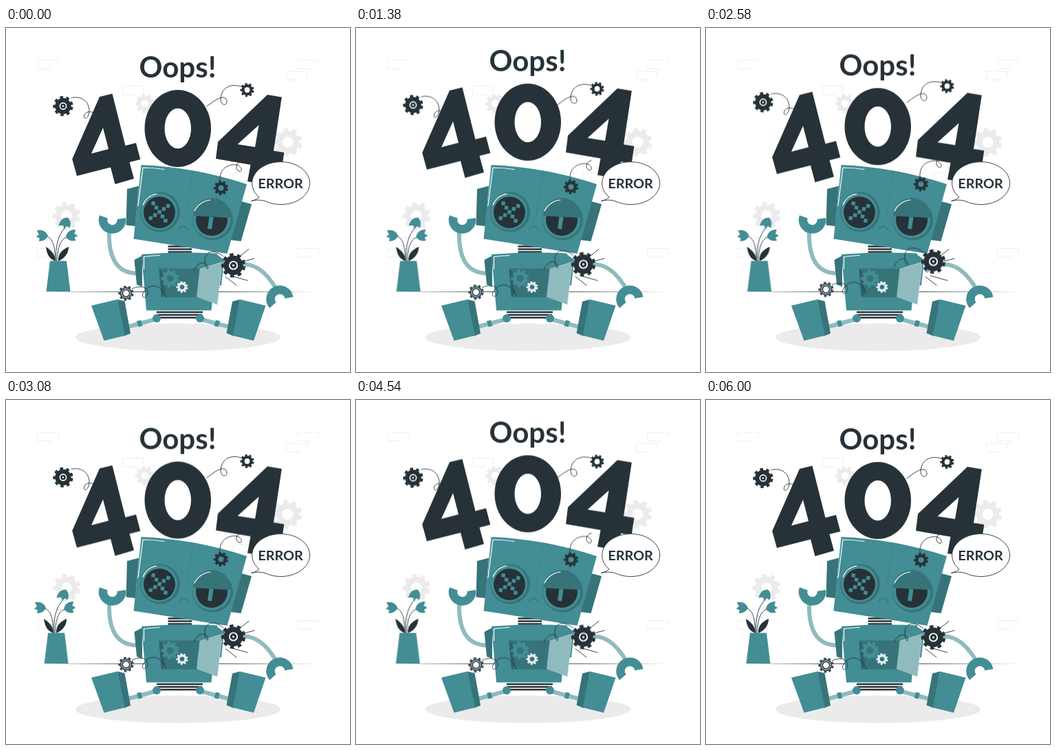
An HTML page for the animation above (6040 ms loop, 500x500 px).

```html
<!DOCTYPE html>
<html lang="en">
<head>
<meta charset="utf-8">
<title>404 error</title>
<style>
html, body { margin: 0; width: 100%; height: 100%; overflow: hidden; background: #fff; }
svg { display: block; width: 100vw; height: 100vh; }
text { font-family: Lato, "Open Sans", sans-serif; font-weight: 700; text-anchor: middle; fill: #263238; }
.ink { fill: #263238; }
.teal { fill: #438d94; }
.deep { fill: #36747a; }
.pale { fill: #8fbbbf; }
.wire { fill: none; stroke: #263238; stroke-width: .9; stroke-linecap: round; }
.shine { fill: none; stroke: #fff; stroke-width: 1.2; stroke-linecap: round; }
.seam { fill: none; stroke: #36747a; }
.limb { fill: none; stroke: #8fbbbf; stroke-width: 6; }
.claw { fill: none; stroke: #438d94; stroke-width: 12.5; }
.bricks { fill: none; stroke: #ebebeb; stroke-width: .8; }

/* 6 s of motion, then a 40 ms hold */
.float, .bob, .sway { animation: float 6040ms linear infinite; }
.bob { animation-name: bob; }
.sway { animation-name: sway; }
@keyframes float {
  0%, 49.67%, 99.34%, 100% { transform: translateY(0); }
  24.83%, 74.5% { transform: translateY(-10px); }
}
@keyframes bob {
  0%, 24.83%, 49.67%, 74.5%, 99.34%, 100% { transform: translateY(0); }
  12.42%, 37.25%, 62.08%, 86.92% { transform: translateY(-10px); }
}
@keyframes sway {
  0%, 99.34%, 100% { transform: translateX(0); }
  9.93%, 89.4% { transform: translateX(-1px); }
  19.87%, 79.47% { transform: translateX(2px); }
  29.8%, 49.67%, 69.54% { transform: translateX(-4px); }
  39.74%, 59.6% { transform: translateX(4px); }
}
</style>
</head>
<body>
<svg viewBox="0 0 500 500">
  <defs>
    <g id="gear" fill="none">
      <circle r=".6" stroke-width=".42"/>
      <circle r=".88" stroke-width=".26" pathLength="16" stroke-dasharray="1" transform="rotate(5)"/>
    </g>
    <g id="hub" stroke="none">
      <circle r=".5" fill="#263238"/>
      <circle r=".32" fill="none" stroke="#fff" stroke-width=".11"/>
      <circle r=".09" fill="#fff"/>
    </g>
    <path id="brick" d="M20 12.500H0V0H30V9"/>
    <path id="px" class="teal" d="M-2.7-2.7h5.4v5.4h-5.4z"/>
    <path id="bloom" d="M0 0C-3-7-8-9-16-8C-15-5-14-4-13-2C-15-1-16 0-17 2C-14 2-13 3-12 4C-13 5-13 6-13 8C-7 8-2 5 0 0Z"/>
  </defs>

  <!-- Background -->
  <g class="bricks">
    <use href="#brick" x="46" y="47"/>
    <use href="#brick" x="424" y="47"/>
    <use href="#brick" x="407.500" y="63"/>
    <use href="#brick" x="169.500" y="84.500"/>
    <use href="#brick" x="46" y="320.500"/>
    <use href="#brick" x="424" y="320.500"/>
    <use href="#brick" x="65" y="304.500"/>
    <use href="#brick" x="330" y="210.500"/>
  </g>
  <g stroke="#ebebeb">
    <use href="#gear" transform="translate(202 110) scale(14)"/>
    <use href="#gear" transform="translate(409.500 166) scale(20.500)"/>
    <use href="#gear" transform="translate(88 273) scale(20)"/>
  </g>
  <path class="ink" d="M46 383.300L250 382.700L454 383.300L250 383.900Z"/>
  <ellipse cx="250" cy="449.500" rx="149" ry="20" fill="#ebebeb"/>

  <!-- Plant -->
  <g class="sway">
    <g class="wire">
      <path d="M73 339C71 318 76 301 85 291"/>
      <path d="M74 339C75 320 79 306 89 304"/>
      <path d="M71 339C72 322 69 306 60 303"/>
    </g>
    <path class="ink" d="M72 339C61 335 59 326 58 318C66 323 72 330 72 339ZM76 339C75 328 82 322 91 318C91 328 85 335 76 339Z"/>
    <g class="teal">
      <use href="#bloom" transform="translate(61 302)"/>
      <use href="#bloom" transform="translate(87 304) rotate(-12) scale(-1 1)"/>
      <use href="#bloom" transform="translate(90 275.500) rotate(-68)"/>
    </g>
    <path class="teal" d="M64 338.500H88L93.500 383H58.500Z"/>
  </g>

  <!-- Heading -->
  <g class="float">
    <text x="249.500" y="72.500" font-size="42">Oops!</text>
    <g class="ink" fill-rule="evenodd">
      <path d="M136 100L154.500 95.500L173.500 171L189 167L195.300 191L179.500 195L186 219L158.500 227L152 202.500L103 215L96.200 190.500ZM141 145L124 182.500L149 176Z"/>
      <path d="M201.500 146a48.250 56 0 1 1 96.500 0a48.250 56 0 1 1-96.500 0ZM230.500 146a19.250 29.300 0 1 0 38.500 0a19.250 29.300 0 1 0-38.500 0Z"/>
      <path d="M380 97L400.800 100.500L389 178.500L404.300 181L400.600 206L385 203.400L381 228L351 223L355.500 198.700L305 190L308 165.500ZM367.500 141L336.500 169L362 173Z"/>
    </g>
  </g>

  <!-- Arms -->
  <path class="limb" d="M150 296C149 334 161 356 190 356.500"/>
  <path class="claw" d="M141.800 274.400A13.500 13.500 0 1 0 167.800 276.900"/>
  <path class="limb" d="M319 354C341 337 368 338 392 378"/>
  <path class="claw" d="M387.800 402.900A13.500 13.500 0 1 1 411.300 391.900"/>

  <!-- Legs -->
  <path class="limb" d="M219 423L178 434M282 423L323 434"/>
  <path class="teal" d="M190 426L196 424.500L198.500 433L192.500 434.500ZM311 426L305 424.500L302.500 433L308.500 434.500Z"/>
  <path class="deep" d="M162 394.500L172.500 397L181 444L171 448ZM340 394.500L329 397.500L320.500 443.500L331 448Z"/>
  <path class="teal" d="M124 403.500L162 394.500L173 447L142.500 454.500ZM377.500 403.500L340 394.500L329.500 447L360 454.500Z"/>
  <path d="M219 413H286M220 417H285M222 421H283" stroke="#263238" stroke-width="2.600"/>
  <g class="teal">
    <circle cx="219" cy="422" r="6"/>
    <circle cx="282" cy="422" r="6"/>
  </g>

  <!-- Torso -->
  <path d="M235.500 317.500H270M235.500 321.500H270M235.500 325.500H270" stroke="#263238" stroke-width="2.600"/>
  <path class="deep" d="M186.500 337L198 331V376L190 373Z"/>
  <path class="teal" d="M305 328L317 337L313 374L303 376Z"/>
  <path class="teal" d="M197 329Q252 325 307 327.500L298.500 410.500H204Z"/>
  <path class="shine" d="M200.500 350V332.500Q213 331 223 330.500"/>
  <path class="deep" d="M222.500 349.500H283V391.500H226Z"/>
  <path d="M222.500 349.500L229 356L231 386L226 391.500Z" fill="#2d6166"/>
  <use href="#gear" transform="translate(238.500 364) scale(13)" stroke="#438d94"/>
  <use href="#gear" transform="translate(256 376.500) scale(8.500)" stroke="#e3eeef"/>
  <path class="pale" d="M281.500 350.500L314.500 340L307 402L277 391Z"/>
  <path d="M281.500 350.500L314.500 340L307 402" fill="none" stroke="#b4d2d4" stroke-width=".8"/>

  <!-- Head -->
  <path class="deep" d="M176 234L193 229.500L188 288L174.500 286.500ZM342 252L357 256L341.500 310L326 308Z"/>
  <path class="teal" d="M196.500 199Q274 202 350 227L321.500 328Q253 317 185.500 306.500Z"/>
  <path class="shine" d="M192 258L199 203Q214 203 230 205.500"/>
  <path class="seam" d="M272 208L261 280" stroke-width=".6" stroke-dasharray="5 3"/>
  <path class="seam" d="M251 293Q258 283 265.500 294" stroke-width="1.300"/>

  <circle class="deep" cx="224" cy="267.500" r="29"/>
  <circle class="teal" cx="222.500" cy="267" r="26.500"/>
  <circle class="ink" cx="223" cy="268" r="23"/>
  <path class="shine" d="M199 257A26.500 26.500 0 0 1 219 241" stroke-width=".8"/>
  <g transform="translate(223 267.500) rotate(10)">
    <use href="#px"/>
    <use href="#px" x="-5.500" y="-5.500"/><use href="#px" x="5.500" y="-5.500"/>
    <use href="#px" x="-5.500" y="5.500"/><use href="#px" x="5.500" y="5.500"/>
    <use href="#px" x="-11" y="-11"/><use href="#px" x="11" y="-11"/>
    <use href="#px" x="-11" y="11"/><use href="#px" x="11" y="11"/>
  </g>

  <circle class="deep" cx="300.500" cy="279" r="29.500"/>
  <circle class="teal" cx="299" cy="278" r="27.500"/>
  <circle class="ink" cx="299" cy="279" r="23"/>
  <path class="teal" d="M295.500 274L301.500 275L299 292.500L293 291.500Z"/>
  <path class="deep" d="M272 273A27.500 27.500 0 0 1 327 276Z"/>
  <path class="shine" d="M274 266A28 28 0 0 1 297 250"/>

  <!-- Sparks -->
  <path class="wire" d="M341 331L353 321.500M346 339L361 335M319 361.500L335 374M326 360L351 367"/>

  <!-- Loose gears -->
  <g class="bob" stroke="#263238">
    <path class="wire" d="M95 101.500C110 98 121 107 121 121C120 134 111 134 114 126C117 121 123 121 127 123"/>
    <path class="wire" d="M342 85C326 80 313 87 312 103C312 114 322 113 321 106C318 94 302 106 292 114"/>
    <path class="wire" d="M311 223C309 204 324 197 336 199C345 203 343 210 338 208C332 204 335 196 342 194"/>
    <path class="wire" d="M316 332C301 320 289 325 289 338C289 350 295 354 293 346C288 337 277 342 273 353"/>
    <path class="wire" d="M183 379C196 373 206 377 206 386C204 395 196 392 199 386C207 371 224 370 233 391"/>
    <use href="#gear" transform="translate(83 113.500) scale(14.500)"/>
    <use href="#hub" transform="translate(83 113.500) scale(14.500)"/>
    <use href="#gear" transform="translate(350.500 90) scale(10)"/>
    <use href="#gear" transform="translate(312.500 232.500) scale(10.500)"/>
    <use href="#gear" transform="translate(330.500 345) scale(17.500)"/>
    <use href="#hub" transform="translate(330.500 345) scale(17.500)"/>
    <g transform="translate(174.500 385.500) scale(11)" stroke="#37474f">
      <circle r=".6" fill="#fff" stroke="none"/>
      <use href="#gear"/>
      <circle r=".6" fill="none" stroke="#fff" stroke-width=".07"/>
    </g>
  </g>

  <!-- Speech bubble -->
  <path d="M368 246A42 31 0 1 1 377 251.700Q367 248.500 356.500 251.500Q364 250 368 246Z" fill="#fff" stroke="#263238" stroke-width=".9"/>
  <text x="399" y="233" font-size="19.800">ERROR</text>
</svg>
</body>
</html>
```
